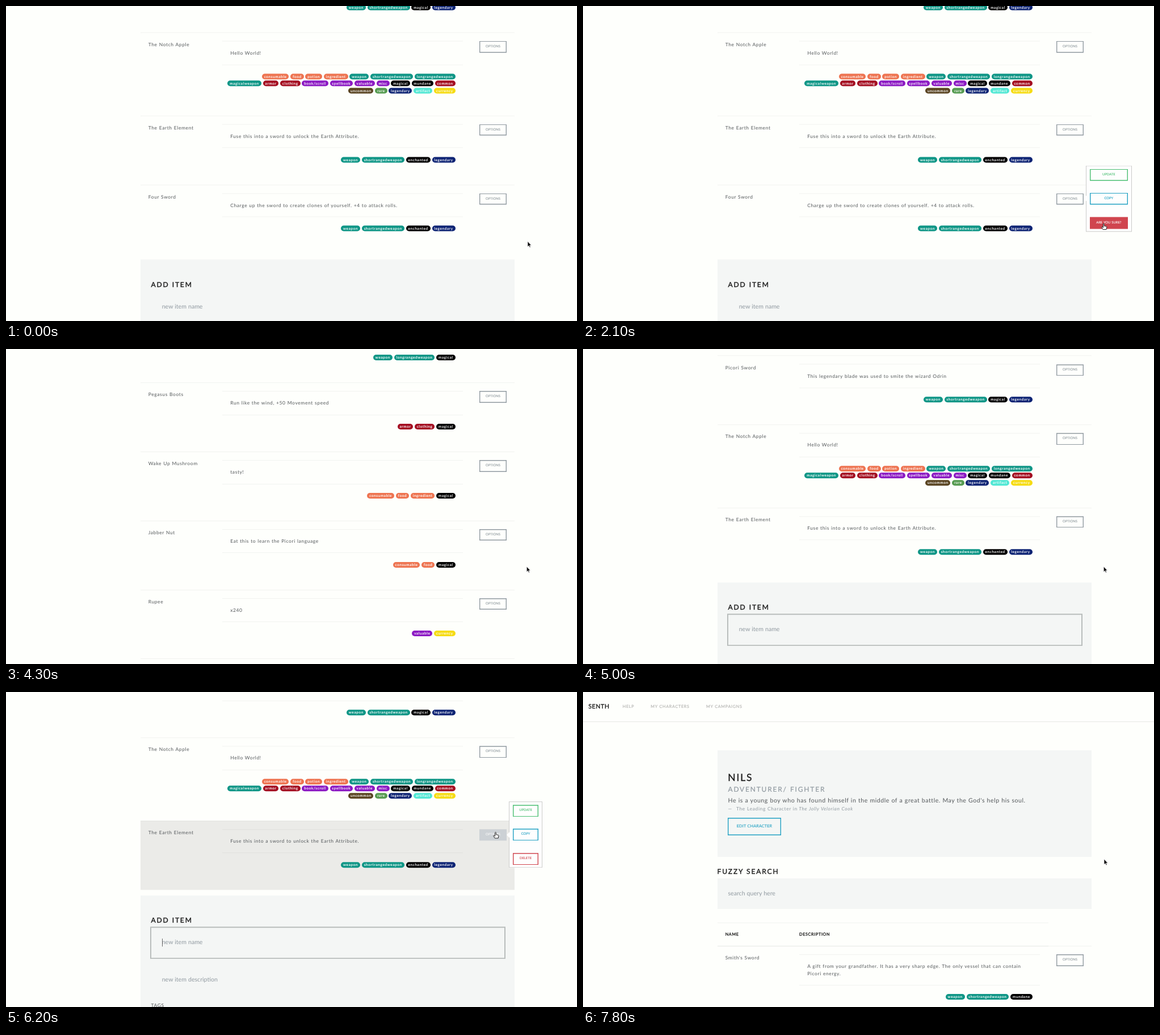
Animation of 1006 by 556 pixels, one loop 8000 ms. Source, as an HTML page:

```html
<!DOCTYPE html>
<html lang="en">
<head>
<meta charset="utf-8">
<title>Item list</title>
<style>
html, body { margin: 0; width: 100%; height: 100%; overflow: hidden; background: #fefffc; }
#stage { position: relative; width: 1006px; height: 556px; overflow: hidden; background: #fefffc;
  font: 8.47px/16px Lato, "Open Sans", sans-serif; word-spacing: .04em; color: #55595c;
  text-rendering: geometricPrecision; }
#page { position: absolute; left: 0; top: 0; width: 1006px; }
#page div, #cursor { position: absolute; white-space: pre; }
.body { letter-spacing: .61px; }
.muted { color: #919aa1; letter-spacing: .605px; }
.lead { font-size: 10.6px; letter-spacing: .53px; }
.name { font-size: 17.5px; letter-spacing: 1.8px; color: #1a1a1a; -webkit-text-stroke: .3px; }
.sub { font-size: 12px; letter-spacing: 1.8px; color: #919aa1; -webkit-text-stroke: .2px; }
.head { font-size: 12.1px; letter-spacing: 1.8px; color: #1a1a1a; -webkit-text-stroke: .35px; }
.brand { font-size: 10.6px; letter-spacing: .6px; color: #1a1a1a; -webkit-text-stroke: .3px; }
.nav { font-size: 7.26px; letter-spacing: .68px; color: #b4b4b2; -webkit-text-stroke: .15px; }
.th { font-size: 7.26px; letter-spacing: .65px; color: #1a1a1a; -webkit-text-stroke: .3px; }
.hint { font-size: 10.6px; color: #919aa1; }
.panel { background: #f4f6f5; }
.line { height: 1px; background: rgba(0, 20, 20, .052); }
.row { left: 236.5px; width: 659.5px; }
.row.hover { background: #ebebe8; }
#page .tags { left: 100px; width: 455px; display: flex; gap: 2.9px; justify-content: flex-end; }
.tags span { height: 10px; padding: 0 3.8px; border-radius: 5px; font-size: 6.35px; line-height: 11.6px;
  letter-spacing: .68px; color: #fff; -webkit-text-stroke: .15px; }
.btn { box-sizing: border-box; box-shadow: inset 0 0 0 1.4px; font-size: 5.9px; text-align: center;
  color: var(--c); -webkit-text-stroke: .1px; }
.opt { --c: #919aa1; left: 597.5px; top: 14.8px; width: 48px; height: 20.5px; line-height: 20px; }
.opt.hover { background: #ccd1d5; color: #f8f8f8; box-shadow: none; }
.edit { --c: #22a1c3; font-size: 7.26px; letter-spacing: .15px; line-height: 30.5px; }
.focus { box-shadow: inset 0 0 0 2px #b9bdbc; }
#page .pop { left: 886px; height: 117px; padding: 0 7.2px; box-sizing: border-box;
  background: #fefefe; box-shadow: inset 0 0 0 1px #cbcbca; }
.pop::before { content: ""; position: absolute; left: -4.5px; top: 53.5px; border: 5px solid transparent;
  border-left: 0; border-right-color: #fefefe; }
#page .pop .btn { position: relative; height: 21px; margin: 5.7px 0 21.6px; padding: 0 11px; line-height: 20.5px; }
.pop .btn + .btn { margin-top: 0 !important; }
.pop .btn.hover { background: var(--c); color: #fff; box-shadow: none; }
.pop .btn.ring { box-shadow: 0 0 0 1.9px rgba(208, 69, 79, .45); }
#cursor { left: 0; top: 0; overflow: visible; }
</style>
</head>
<body>
<div id="stage">
  <div id="page"></div>
  <svg id="cursor" width="12" height="14">
    <path id="arrow" d="M0 0V9.5L2.2 7.6 3.7 10.8 5.2 10.1 3.7 7H6.6Z" fill="#111" stroke="#fff" stroke-width=".6"/>
    <path id="hand" d="M-.9.9C-.9-.4.9-.4.9.9V4.2L4.6 5C5.4 5.2 5.6 5.8 5.4 6.6L4.7 10.5H-1.2L-3.6 6.8C-4 5.8-3 5.2-2.2 6L-.9 7.2Z"
      fill="#fff" stroke="#222" stroke-width="1"/>
  </svg>
</div>
<script>
const $ = id => document.getElementById(id);
const page = $('page');
const LOOP = 8000, STEP = 100;

const COLORS = {
  '#0f9686': 'weapon shortrangedweapon longrangedweapon magicalweapon',
  '#ee7451': 'consumable food potion ingredient',
  '#a40f22': 'armor clothing common',
  '#8c1ac3': 'book/scroll spellbook valuable misc',
  '#000': 'magical mundane enchanted',
  '#5a4522': 'uncommon',
  '#579c52': 'rare',
  '#0e2474': 'legendary',
  '#51e8d4': 'artifact',
  '#f6dc14': 'currency'
};
const tagColor = {};
for (const c in COLORS) COLORS[c].split(' ').forEach(tag => tagColor[tag] = c);

// name, description lines, lines of tags
const ITEMS = [
  ["Smith's Sword", 'A gift from your grandfather. It has a very sharp edge. The only vessel that can contain|Picori energy.',
    'weapon shortrangedweapon mundane'],
  ['Bow', 'Hits a target from far away.', 'weapon longrangedweapon magical'],
  ['Pegasus Boots', 'Run like the wind, +50 Movement speed', 'armor clothing magical'],
  ['Wake Up Mushroom', 'tasty!', 'consumable food ingredient magical'],
  ['Jabber Nut', 'Eat this to learn the Picori language', 'consumable food magical'],
  ['Rupee', 'x240', 'valuable currency'],
  ['Picori Sword', 'This legendary blade was used to smite the wizard Odrin', 'weapon shortrangedweapon magical legendary'],
  ['The Notch Apple', 'Hello World!',
    'consumable food potion ingredient weapon shortrangedweapon longrangedweapon|' +
    'magicalweapon armor clothing book/scroll spellbook valuable misc magical mundane common|' +
    'uncommon rare legendary artifact currency'],
  ['The Earth Element', 'Fuse this into a sword to unlock the Earth Attribute.', 'weapon shortrangedweapon enchanted legendary'],
  ['Four Sword', 'Charge up the sword to create clones of yourself. +4 to attack rolls.', 'weapon shortrangedweapon enchanted legendary']
];

function box(parent, cls, x, y, w, h) {
  const el = parent.appendChild(document.createElement('div'));
  el.className = cls;
  if (x != null) el.style.left = x + 'px';
  if (y != null) el.style.top = y + 'px';
  if (w) el.style.width = w + 'px';
  if (h) el.style.height = h + 'px';
  return el;
}
// y is the middle of the text line
function text(parent, cls, x, y, str) {
  const el = box(parent, cls, x, y - 8);
  el.textContent = str;
  return el;
}

function addRow([name, desc, tags], top) {
  const lines = desc.split('|'), tagLines = tags.split('|');
  const extra = (lines.length - 1) * 12.7;
  const h = 121.8 + extra + (tagLines.length - 1) * 12.4;
  const el = box(page, 'row', null, top, 0, h);
  box(el, 'line', 0, -.5, 659.5);
  text(el, 'body', 14.2, 20.9, name);
  box(el, 'line', 144.5, 14.6, 424);
  lines.forEach((s, i) => text(el, 'body', 158.7, 35.8 + i * 12.7, s));
  box(el, 'line', 144.5, 56.2 + extra, 424);
  tagLines.forEach((list, i) => {
    const line = box(el, 'tags', null, 72.4 + extra + i * 12.4);
    for (const tag of list.split(' ')) {
      const pill = line.appendChild(document.createElement('span'));
      pill.textContent = tag;
      pill.style.background = tagColor[tag];
    }
  });
  const opt = box(el, 'btn opt');
  opt.textContent = 'OPTIONS';
  return { el, opt, top, h };
}

// navigation and character header
text(page, 'brand', 9.5, 26, 'SENTH');
text(page, 'nav', 69.7, 26.3, 'HELP');
text(page, 'nav', 119.3, 26.3, 'MY CHARACTERS');
text(page, 'nav', 217, 26.3, 'MY CAMPAIGNS');
box(page, 'line', 0, 52, 1006).style.background = '#e7e7e5';
box(page, 'panel', 236.5, 102.7, 659.5, 188.3);
text(page, 'name', 255.3, 150.5, 'NILS');
text(page, 'sub', 255.5, 172.3, 'ADVENTURER/ FIGHTER');
text(page, 'lead', 255.5, 192.3, "He is a young boy who has found himself in the middle of a great battle. May the God's help his soul.");
text(page, 'muted', 255.5, 206.3, '—');
text(page, 'muted', 270, 206.3, 'The Leading Character in ');
const work = text(page, 'muted', 380.3, 206.3, '');
work.style.fontStyle = 'italic';
box(page, 'btn edit', 255, 222, 94, 31).textContent = 'EDIT CHARACTER';

// search and table head
text(page, 'head', 236.5, 317.3, 'FUZZY SEARCH');
box(page, 'panel', 236.5, 329, 659.5, 53.5);
text(page, 'hint', 255.5, 356, 'search query here');
box(page, 'line', 236.5, 407, 583.5);
text(page, 'th', 250.7, 428.3, 'NAME');
text(page, 'th', 381, 428.3, 'DESCRIPTION');
box(page, 'line', 236.5, 447.8, 583.5);

let bottom = 448.3;
const rows = ITEMS.map(item => {
  const row = addRow(item, bottom);
  bottom += row.h;
  return row;
});
const lastRow = rows[rows.length - 1];

// form below the list
const form = box(page, 'panel', 236.5, 0, 659.5, 420);
text(form, 'head', 19, 44.5, 'ADD ITEM');
const field = box(form, '', 17, 55, 626, 57);
text(form, 'hint', 38.2, 83.8, 'new item name');
text(form, 'hint', 38.2, 149.5, 'new item description');
text(form, 'body', 19, 194.5, 'TAGS');
const caret = box(form, '', 38, 76.5, 1, 14);
caret.style.background = '#666';

const pop = box(page, 'pop');
const [, , del] = [['UPDATE', '#4bbf73'], ['COPY', '#22a1c3'], ['DELETE', '#d0454f']].map(([label, color]) => {
  const el = box(pop, 'btn');
  el.textContent = label;
  el.style.setProperty('--c', color);
  return el;
});

const SCROLL = [[0, 1266.5], [3099, 1266.5], [3100, 0], [3800, 0], [4300, 645], [4600, 1179.7],
  [5000, 1179.7], [5300, 1232.7], [7699, 1232.7], [7700, 0]];
const POINTER = [[0, 919, 415.5], [300, 919, 415.5], [900, 877, 344], [1100, 876, 343], [1200, 876, 343],
  [2000, 917.3, 384], [5200, 917.3, 384], [5800, 868, 285], [5900, 865, 256], [6200, 862.5, 247.5], [6700, 918, 295]];

function at(keys, t) {
  const i = keys.findIndex(k => k[0] > t);
  if (i < 0) return keys[keys.length - 1].slice(1);
  const a = keys[i - 1], b = keys[i], p = (t - a[0]) / (b[0] - a[0]);
  return a.slice(1).map((v, n) => v + (b[n + 1] - v) * p);
}
const within = (t, ...spans) => spans.some(([a, b]) => t >= a && t < b);
const show = (el, on) => el.style.display = on ? '' : 'none';

function render(t) {
  const [scroll] = at(SCROLL, t), [x, y] = at(POINTER, t);
  const full = t < 3100, docY = y + scroll;
  const open = within(t, [900, 3100], [5900, 7700]);
  const sure = within(t, [2100, 3100], [6800, 7700]);

  page.style.transform = `translateY(${-scroll}px)`;
  work.textContent = t < 7700 ? 'The Fourteen Ballads of Autumn' : 'The Jolly Velorian Cook';
  show(lastRow.el, full);
  form.style.top = (full ? bottom : lastRow.top) + 9.7 + 'px';

  let hand = false;
  for (const row of rows) {
    const dy = docY - row.top;
    const over = x > 236.5 && x < (open ? 886 : 896) && dy >= 0 && dy < row.h;
    const onOpt = over && x > 834 && x < 882 && dy > 14.8 && dy < 35.3;
    row.el.classList.toggle('hover', over);
    row.opt.classList.toggle('hover', onOpt);
    hand = hand || onOpt;
  }

  const owner = full ? lastRow : rows[rows.length - 2];
  const popTop = owner.top - 34.1;
  const onDel = open && x > 893 && docY > popTop + 90.9 && docY < popTop + 112;
  show(pop, open);
  pop.style.top = popTop + 'px';
  del.textContent = sure ? 'ARE YOU SURE?' : 'DELETE';
  del.classList.toggle('hover', onDel);
  del.classList.toggle('ring', within(t, [2400, 3100], [7000, 7700]));

  const focused = within(t, [3100, 6800]);
  field.className = focused ? 'focus' : '';
  show(caret, focused && t > 5000 && Math.floor((t - 200) / 500) % 2 === 0);

  hand = hand || onDel;
  show($('hand'), hand);
  show($('arrow'), !hand);
  $('cursor').style.transform = `translate(${x}px, ${y}px)`;
}

const start = performance.now();
function frame() {
  const t = (performance.now() - start) % LOOP;
  render(Math.floor(t / STEP) * STEP);
  requestAnimationFrame(frame);
}
frame();
</script>
</body>
</html>
```
